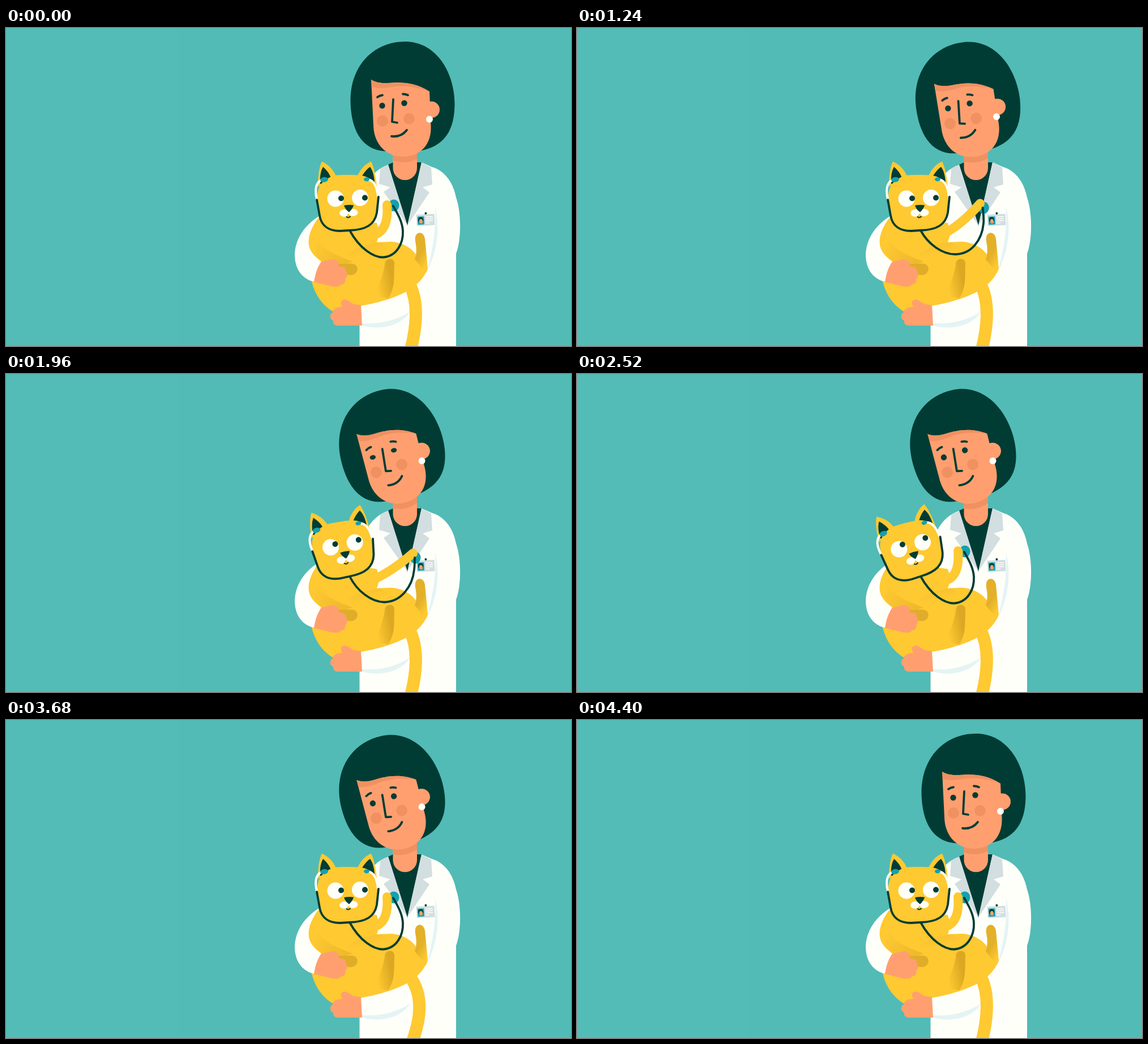
An HTML page for the animation above (4.48 s loop, 998 by 561 pixels).

```html
<!DOCTYPE html>
<html lang="en">
<head>
<meta charset="utf-8">
<title>Vet with a cat</title>
<style>
  html, body { margin: 0; height: 100%; overflow: hidden; background: #52bbb6; }
  svg { display: block; width: 100%; height: 100%; }
  .dark { fill: #013c34; }
  .skin { fill: #ff9f70; }
  .shade { fill: #ef9161; }
  .coat { fill: #fffffa; }
  .lapel { fill: #d2dee0; }
  .fold { fill: #e4f4f4; }
  .cat { fill: #fec931; }
  .teal { fill: #14a0ae; }
  .line { fill: none; stroke: #013c34; stroke-width: 3.8; stroke-linecap: round; stroke-linejoin: round; }
  .tube { fill: none; stroke: #fffffa; stroke-width: 4; stroke-linecap: round; }
  .limb { fill: none; stroke: #fec931; stroke-linecap: round; }
</style>
</head>
<body>
<svg viewBox="0 0 998 561" preserveAspectRatio="none">
  <defs>
    <clipPath id="neckClip"><path d="M683.5 205V247A21.2 21.2 0 0 0 726 247V205Z"/></clipPath>
    <linearGradient id="footShade" x1="0" y1=".7" x2="1" y2=".3">
      <stop offset=".15" stop-color="#dca823" stop-opacity="0"/>
      <stop offset=".8" stop-color="#dca823"/>
    </linearGradient>
    <linearGradient id="toeShade" x1="0" y1="0" x2=".5" y2="1">
      <stop offset="0" stop-color="#e3b02a"/>
      <stop offset=".6" stop-color="#e3b02a"/>
      <stop offset="1" stop-color="#fec931"/>
    </linearGradient>
    <linearGradient id="armShade" x1="0" y1="0" x2="1" y2=".4">
      <stop offset="0" stop-color="#e9b42b" stop-opacity="0"/>
      <stop offset="1" stop-color="#e9b42b" stop-opacity=".75"/>
    </linearGradient>
    <linearGradient id="thighShade" x1="0" y1="0" x2=".35" y2="1">
      <stop offset="0" stop-color="#e9b42b" stop-opacity=".5"/>
      <stop offset=".5" stop-color="#e9b42b" stop-opacity="0"/>
    </linearGradient>
  </defs>

  <rect width="998" height="561" fill="#52bbb6"/>
  <rect width="303" height="561" fill="#53bcb7"/>

  <path class="dark tilt" d="M705 24C648 24 608 68 608.5 128C609 175 625 216 672 217.5L735 216C775 207 792 180 792.5 135C792 75 758 24 705 24Z"/>

  <!-- coat -->
  <path class="coat" d="M676 241C650 250 635 270 628 300L560 328C528 345 510 372 510 402C511 430 527 444 545 448H624.500V561H795V398C804 375 805 328 795 299C789 268 771 250 752 245L734 237Z"/>
  <path class="fold" d="M757 313C767 345 764 390 744 429C752 395 762 350 757 313Z"/>
  <path class="fold" d="M629 521C660 523 690 516 714 500C698 526 660 534 629 525Z"/>
  <path class="dark" d="M675 241L684 237H726L734 237L709 349Z"/>
  <path class="lapel" d="M675 241L661 248L659 275L679 281L667 289L709 348Z"/>
  <path class="lapel" d="M734 237L751 246L753 276L736 281L748 290L709 348Z"/>
  <g transform="rotate(-3 741 338)">
    <rect class="lapel" x="725" y="328.500" width="32" height="20"/>
    <rect class="teal" x="727" y="332" width="11.500" height="14.500"/>
    <ellipse class="dark" cx="732.500" cy="338" rx="4.600" ry="5"/>
    <ellipse class="skin" cx="732.800" cy="340.500" rx="3" ry="4"/>
    <path d="M741 333.500h13M741 337h13M741 340.500h13M741 344h7" stroke="#fffffa" stroke-width="1.500"/>
    <circle class="dark" cx="742" cy="327" r="2"/>
  </g>

  <!-- neck and face -->
  <g clip-path="url(#neckClip)">
    <rect class="skin" x="680" y="200" width="50" height="70"/>
    <ellipse class="shade tilt" cx="702" cy="205" rx="42" ry="32"/>
  </g>
  <g class="tilt">
    <circle class="skin" cx="751.500" cy="144" r="14.500"/>
    <path class="skin" d="M645 91C652 96 664 98 676 97C700 95 722 96 748 112L750.500 172C752 206 732 227 700 227C667 226 649.500 200 649 172Z"/>
    <path class="shade" d="M645 91C652 96 664 98 676 97C700 95 722 96 748 112C726 104 704 101 688 103C672 106 656 108 646 103Z"/>
    <circle class="coat" cx="748" cy="161" r="6"/>
    <circle class="shade" cx="665" cy="164" r="10"/>
    <circle class="shade" cx="712" cy="160" r="10"/>
    <ellipse class="dark eye" cx="664.500" cy="137" rx="5.200"/>
    <ellipse class="dark eye" cx="703.500" cy="132.500" rx="5.200"/>
    <path class="line" d="M656 122Q660 119 665 118.500M701 116.500Q706 116.500 710 118.500M684 126L682 165.500L691 167M681 191Q698 193 708 180"/>
  </g>

  <!-- cat body -->
  <path class="limb" id="tail" stroke-width="22"/>
  <path class="cat" d="M556 330C540 348 531 370 536 387C540 400 550 406 557 412L548 447L540 447C545 470 560 490 577 500L627 490C660 485 700 472 718 458C732 448 740 436 744 427L727 404C718 388 700 378 680 377C670 377 662 378 655 378L660 362L655 344Z"/>
  <path fill="url(#toeShade)" d="M723 376C720 358 738 356 740 372L745 424L742 432L722 408Q727 396 723 376Z"/>
  <path fill="url(#armShade)" d="M552 373C560 392 585 402 612 412L600 416L557 411C546 404 543 390 552 373Z"/>
  <path fill="url(#thighShade)" d="M604 399C620 387 640 380 662 378L690 400L640 430Z"/>
  <path fill="url(#footShade)" d="M669 418C668 404 687 404 686 416C685 438 688 458 675 477L648 472C658 458 665 440 669 418Z"/>
  <path fill="#e0ad2a" d="M580 413C595 419 606 413 616 417C624 422 622 434 610 436L590 434Z"/>

  <!-- hands -->
  <path class="skin" d="M557 412C568 410 577 406 583 409C588 412 588 417 588 421C596 420 601 423 600 429C604 433 603 440 599 443C601 450 595 453 592 452C588 458 582 456 576 456L544 448C546 434 550 422 557 412Z"/>
  <path class="skin" d="M592 487C590 480 598 477 604 481L614 487L627 489L629 525H590C580 526 577 521 578 516C571 514 571 504 577 502C577 495 586 492 594 492Z"/>

  <!-- stethoscope arm -->
  <ellipse class="teal" id="disc" rx="9.500" ry="10.500"/>
  <path class="limb" id="arm" stroke-width="16"/>
  <path class="line" id="cable"/>

  <!-- cat head -->
  <g id="catHead">
    <path class="cat" d="M558 235.500C570 241 579 250 584 264L551 280C551 260 553 246 558 235.500ZM645 235.500C634 240 625 250 620 263L655 280C653 260 650 246 645 235.500Z"/>
    <path class="dark" d="M560 245C568 252 574 260 576 272L555 275C554 262 556 252 560 245ZM643 245C636 250 630 258 627 265L651 272C650 258 647 250 643 245Z"/>
    <path class="cat" d="M580 260Q603 258 626 260C650 263 658 282 657 305C656 340 650 355 607 357C562 358 552 340 550 305C548 280 558 268 580 260Z"/>
    <path class="tube" d="M562 267C549 269 544 281 549 302M637 267C649 267 655 278 657 297"/>
    <ellipse class="teal" cx="562" cy="267.500" rx="7" ry="4.500" transform="rotate(-8 562 267)"/>
    <ellipse class="teal" cx="637" cy="267" rx="5" ry="3.500"/>
    <path class="line" d="M549 303L554 331C557 349 570 358 590 358L607 357C636 356 651 347 655 326L658 298"/>
    <circle class="coat" cx="582" cy="301" r="14.500"/>
    <circle class="coat" cx="625.500" cy="299.500" r="14.500"/>
    <g id="pupils" class="dark"><circle cx="592" cy="300.500" r="5"/><circle cx="634" cy="299.500" r="5"/></g>
    <ellipse class="coat" cx="598" cy="326.500" rx="9" ry="6.500"/>
    <ellipse class="coat" cx="612.500" cy="325.500" rx="9" ry="6.500"/>
    <path class="cat" d="M605 327L611 335H599Z"/>
    <path class="dark" d="M597 313Q605 311.500 614 312.500Q613 318 606 325Q599 320 597 313Z"/>
    <path class="line" style="stroke-width:2" d="M601.500 333Q605 336 608 332.500"/>
  </g>
</svg>
<script>
const LOOP = 4480;
const $ = id => document.getElementById(id);
const headParts = document.querySelectorAll('.tilt');
const eyes = document.querySelectorAll('.eye');

// elbow, paw, disc, then the control points of the cable
const near = [677, 364, 673, 312, 685, 313, 625, 390, 650, 405, 666, 404.5, 690, 403, 702, 380, 701, 358, 700, 340, 690, 325, 684, 314];
const high = [675, 349, 705, 303, 713.5, 310, 620, 380, 645, 396, 668, 396, 695, 396, 712, 375, 715, 345, 716, 330, 713, 320, 711, 310];
const far = [680, 350, 719, 316, 723, 324, 620, 383, 645, 402, 668, 402.5, 698, 402, 718, 375, 721, 345, 722, 338, 722, 330, 722, 324];

const ramp = (t, from, to) => Math.min(1, Math.max(0, (t - from) / (to - from)));
const ease = (t, from, to) => { const k = ramp(t, from, to); return k * k * (3 - 2 * k); };
const mix = (a, b, k) => a.map((v, i) => v + (b[i] - v) * k);
const blink = (t, middle) => {
  const k = Math.max(0, 1 - Math.abs(t - middle) / 160);
  return k * k * (3 - 2 * k);
};

function drawArm(t) {
  let pose = mix(near, high, ease(t, 0, 520));
  pose = mix(pose, far, ease(t, 1000, 1480));
  pose = mix(pose, near, ease(t, 2000, 2530));
  const [ex, ey, px, py, dx, dy, ...cable] = pose;
  $('arm').setAttribute('d', `M642 366Q${ex} ${ey} ${px} ${py}`);
  $('disc').setAttribute('cx', dx);
  $('disc').setAttribute('cy', dy);
  $('cable').setAttribute('d', `M607 357C${cable.join(' ')}`);
}

function drawWoman(t) {
  const tilt = -12 * ease(t, 980, 1480) + 15 * ease(t, 3760, 4160) - 3 * ease(t, 4140, 4380);
  headParts.forEach(part => part.setAttribute('transform', `rotate(${tilt} 704 221)`));
  const closed = Math.max(blink(t, 880), blink(t, 2060));
  eyes.forEach(eye => eye.setAttribute('ry', 5.2 - 3.7 * closed));
}

function drawCat(t) {
  const turn = ease(t, 1680, 2160) - ease(t, 3260, 3660);
  $('catHead').setAttribute('transform', `rotate(${-14.5 * turn} 607 357)`);
  $('pupils').setAttribute('transform', `translate(${-2 * turn} ${-6 * turn})`);
  const wag = ease(t, 3260, 3760) - ease(t, 3840, 4420);
  $('tail').setAttribute('d', `M713 452C${727 + 9 * wag} ${480 + 2 * wag} ${727 + 9 * wag} 520 ${715 + 3 * wag} 567`);
}

function frame(now) {
  const t = now % LOOP;
  drawArm(t);
  drawWoman(t);
  drawCat(t);
  requestAnimationFrame(frame);
}
frame(performance.now());
</script>
</body>
</html>
```
